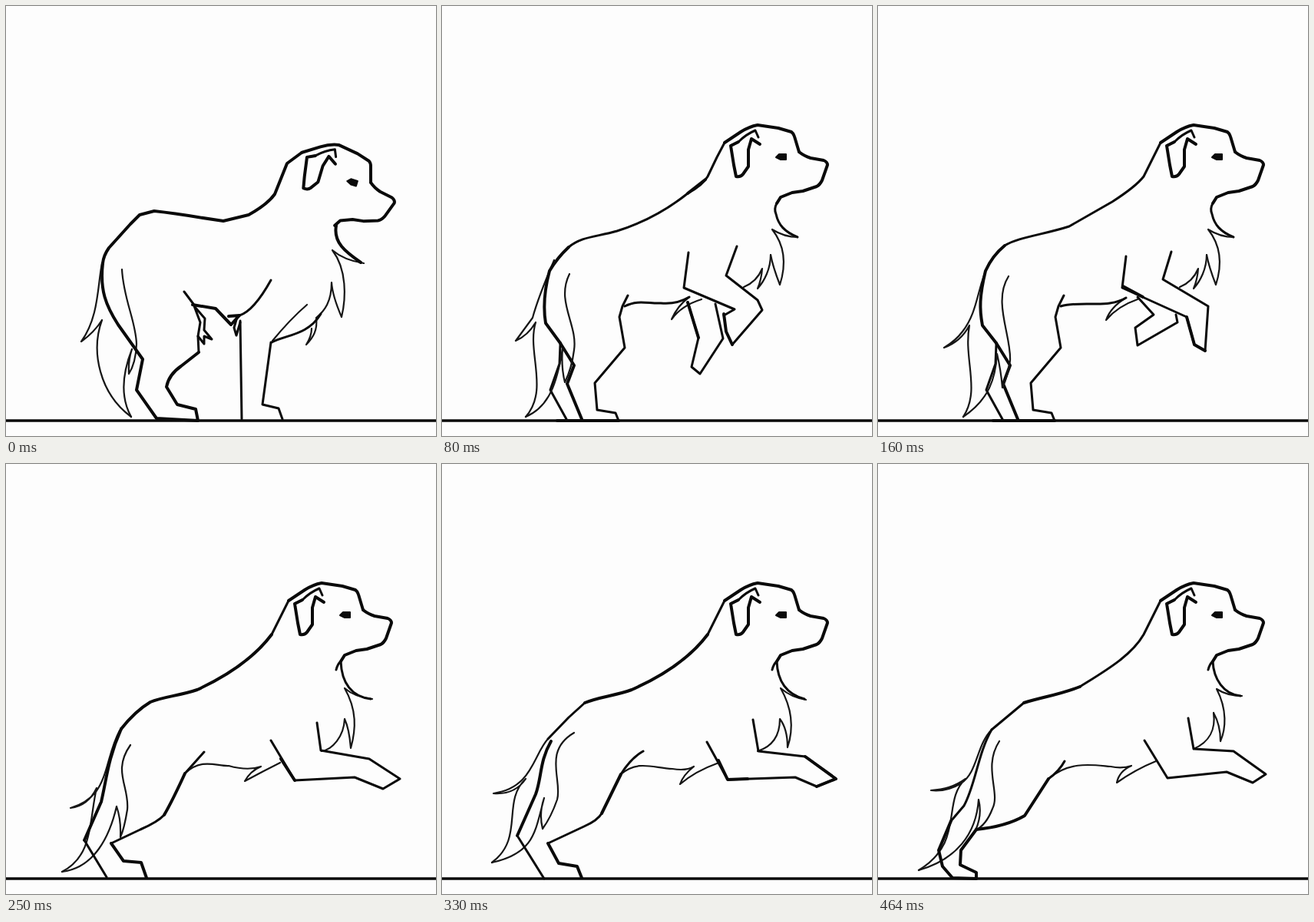
These frames come from a looping animation (560x560 px, 500 ms). An HTML page:

```html
<!DOCTYPE html>
<html lang="en">
<head>
<meta charset="utf-8">
<title>Leaping dog</title>
<style>
  html, body { margin: 0; width: 100%; height: 100%; overflow: hidden; background: #fdfdfd; }
  svg { display: block; width: 100%; height: 100%; }
  path { fill: none; stroke: #0a0a0a; stroke-linejoin: round; stroke-linecap: round; }
  .fine { stroke: #161616; stroke-width: 2.2; }
  .mid { stroke-width: 3; }
  .bold { stroke-width: 4; }
  .eye { fill: #0a0a0a; stroke-width: 2; }
</style>
</head>
<body>
<svg viewBox="0 0 560 560">
  <defs>
    <g id="head">
      <path class="bold" d="M368 178L389 164Q400 157 411 155L438 159L455 164Q458 166 459 170L465 190"/>
      <path class="bold" d="M465 190Q471 195 480 198L497 201Q502 203 502 207L495 227Q492 233 488 235L470 241L456 243L441 249L436 257"/>
      <path class="mid" d="M412 171L408 162Q396 167 386 177L376 182"/>
      <path class="bold" d="M386 177L376 182L380 207L383 222Q389 223 392 219L399 209L399 187L403 173L414 180"/>
      <path class="eye" d="M435 197L439 193L448 193L448 200L441 200Z"/>
    </g>
    <g id="stance">
      <path class="mid" d="M154 441L153 466L141 500L162 538"/>
      <path class="bold" d="M154 439L172 468L163 492L182 538"/>
      <path class="mid" d="M242 377L235 391L231 405L238 445L199 491L202 526L226 530L230 540"/>
      <path class="bold" d="M150 540H230"/>
    </g>
    <g id="ruff">
      <path class="mid" d="M436 257Q432 264 435 271C438 285 446 294 463 301"/>
      <path class="fine" d="M463 301Q446 301 430 291C445 310 449 335 440 363Q431 340 428 324"/>
      <path class="fine" d="M428 324C428 342 420 358 411 368Q416 356 417 342Q410 359 393 366"/>
    </g>
  </defs>
  <path style="stroke-width:3.5" d="M0 540H560"/>
</svg>
<script>
const NS = 'http://www.w3.org/2000/svg';
const svg = document.querySelector('svg');
const LOOP = 500;

const poses = [
  {
    at: 0,
    // The lowered head is the same drawing, tilted about the eye.
    uses: [['head', 'translate(451 230) rotate(16.5) translate(-442 -197)']],
    fine: [
      'M466 335Q440 331 425 318C444 343 443 380 437 405Q425 377 424 360C424 385 415 397 404 406',
      'M404 406C406 422 400 432 391 441Q398 430 398 420M347 436Q370 408 392 389',
      'M125 335C119 365 121 405 98 437Q115 425 125 409C110 450 122 505 163 535',
      'M163 535C149 510 151 480 164 447M151 343C153 382 169 410 170 440Q169 465 160 479Q159 462 164 447'
    ],
    mid: [
      'M346 438C365 428 393 429 410 401M304 403C320 398 335 375 345 357',
      'M305 410L307 538M345 438L334 519L355 524L360 538',
      'M232 372L244 388L253 412L250 430L258 440L258 430L268 434L258 422L259 407L246 392',
      'M301 405L297 419L300 429L305 412M250 430L251 451'
    ],
    bold: [
      'M385 191L366 205L350 245Q341 258 316 272L283 280L250 275Q220 270 193 267L174 272L162 284L134 315Q127 325 126 335',
      'M126 335C122 370 130 390 146 415L178 460L170 500L196 537L250 540L247 525L223 519L209 496Q212 480 228 469L251 451',
      'M243 389L273 394L293 415L304 403L290 404M430 286C426 308 442 320 462 334'
    ]
  },
  {
    at: 80,
    uses: [['head'], ['stance'], ['ruff']],
    fine: [
      'M146 331C137 352 125 380 118 406L96 436Q112 429 122 412C110 450 140 500 109 535',
      'M109 535C140 522 150 490 157 446M166 349C148 385 177 415 172 448Q169 472 160 490Q155 470 157 446',
      'M322 379Q307 390 299 408Q312 390 338 382'
    ],
    mid: [
      'M368 178L358 197L346 222Q340 233 320 244C290 268 260 283 228 293C200 301 182 300 165 314',
      'M238 391C255 382 270 388 285 387Q305 389 322 379',
      'M321 321L315 367L381 395L367 403M384 313L370 351L411 383L417 396L378 441',
      'M320 386L334 432L325 470L336 479L366 433L356 388'
    ],
    bold: [
      'M343 226L320 244M165 314Q150 328 140 345C132 375 132 395 135 413L154 439',
      'M367 401L370 424L378 441M320 386L334 432'
    ]
  },
  {
    at: 160,
    uses: [['head'], ['stance'], ['ruff']],
    fine: [
      'M145 334C129 365 131 397 110 424Q101 436 86 445Q108 437 119 416C111 460 134 500 111 535',
      'M111 535C145 512 153 485 155 453M170 352C149 385 174 430 172 462Q169 482 162 497Q160 474 155 453',
      'M323 380Q303 392 297 409Q312 391 338 382'
    ],
    mid: [
      'M368 178L346 222Q336 235 305 255L249 287C215 298 182 301 165 312',
      'M238 391C260 385 285 390 302 387Q315 385 323 380',
      'M323 326L318 367L402 405L412 441L426 449L430 391L371 356L382 320',
      'M338 379L359 402L335 419L338 442L390 412L388 402'
    ],
    bold: [
      'M165 312Q149 325 140 345C132 378 132 395 136 416L154 439',
      'M319 365L345 379M402 405L412 441L426 449'
    ]
  },
  {
    at: 250,
    uses: [['head']],
    fine: [
      'M477 306Q455 304 441 292C457 320 456 345 449 370Q447 345 441 332C440 355 425 372 411 374',
      'M148 347C133 375 133 405 117 427Q105 442 84 448Q107 445 118 422C108 465 114 510 73 531',
      'M73 531C115 526 135 485 144 446M162 366C138 400 161 420 158 450Q154 475 149 486Q150 463 144 446',
      'M233 403C255 382 275 394 290 393Q315 400 332 394Q318 400 311 413Q335 400 357 389'
    ],
    mid: [
      'M368 178L346 222M430 268Q432 260 436 257C437 285 450 303 475 306',
      'M345 360L376 412L454 408L491 423L513 410L473 384L410 373L405 337',
      'M102 490L131 538M233 403L258 375M137 494L175 476Q198 466 206 457'
    ],
    bold: [
      'M346 222C325 250 290 275 249 294C225 302 205 303 188 310Q168 322 150 345',
      'M150 345C133 383 131 410 124 440L102 490M206 457Q216 440 233 403',
      'M137 494L153 517L176 519L183 539M358 384L376 412'
    ]
  },
  {
    at: 330,
    uses: [['head']],
    fine: [
      'M474 307Q455 304 441 292C457 320 458 345 450 369Q450 345 440 332C440 355 430 368 411 374',
      'M138 358C119 378 118 422 67 429Q95 431 109 410C77 440 108 487 65 519',
      'M65 519C120 507 121 480 133 435M172 350C131 374 157 412 150 437Q142 460 131 475Q126 455 133 435',
      'M233 404C255 385 275 396 300 397Q318 400 328 394Q314 405 310 417Q330 400 358 390'
    ],
    mid: [
      'M368 178L346 222M430 268Q432 260 436 257C437 285 450 300 472 306',
      'M186 311L165 330L138 358M233 404Q246 383 262 374',
      'M345 362L372 411L460 408L488 420L513 410L473 381L412 374L405 333',
      'M98 484L133 540M138 494L185 472Q203 464 208 455'
    ],
    bold: [
      'M346 222C325 250 290 275 247 294C225 302 205 303 186 311',
      'M142 361C127 387 130 408 122 430L98 484M208 455L233 404',
      'M138 494L152 520L176 524L182 539M360 386L372 411L398 410M473 381L513 410L488 420'
    ]
  },
  {
    at: 410,
    uses: [['head']],
    fine: [
      'M474 302Q455 302 441 293C455 320 453 345 446 361Q446 340 437 324C440 345 432 362 411 371',
      'M148 346C128 366 130 402 108 416Q90 427 69 425Q95 424 114 410C82 440 114 492 53 529',
      'M53 529C102 515 128 482 131 437M158 361C136 395 160 428 149 449Q141 470 127 477Q136 457 131 437',
      'M222 410C250 386 280 392 303 394Q318 397 330 393Q314 400 311 415Q335 398 362 387'
    ],
    mid: [
      'M368 178L346 222C330 250 295 270 263 290M430 268Q432 260 436 257C437 280 450 300 472 302',
      'M190 311L148 346M222 410Q236 400 243 387',
      'M347 360L377 409L454 401L488 415L505 404L463 374L411 371L404 331',
      'M148 346C130 377 127 418 112 445L95 465'
    ],
    bold: [
      'M263 290C235 301 215 303 190 311M128 476Q167 472 191 458L222 410',
      'M95 465L79 503L84 524L97 539L128 540L128 532L107 522L108 503L128 476'
    ]
  }
];

function add(parent, tag, attrs) {
  const el = document.createElementNS(NS, tag);
  for (const key in attrs) el.setAttribute(key, attrs[key]);
  return parent.appendChild(el);
}

function draw(pose) {
  const group = add(svg, 'g', {});
  for (const [id, transform = ''] of pose.uses) add(group, 'use', { href: '#' + id, transform });
  for (const pen of ['fine', 'mid', 'bold'])
    for (const d of pose[pen]) add(group, 'path', { class: pen, d });
  return group;
}

const groups = poses.map(draw);
const start = performance.now();

function show(now) {
  const t = Math.max(0, now - start) % LOOP;
  const current = poses.findLastIndex(pose => pose.at <= t);
  groups.forEach((group, i) => group.setAttribute('visibility', i === current ? 'visible' : 'hidden'));
  requestAnimationFrame(show);
}
show(start);
</script>
</body>
</html>
```
